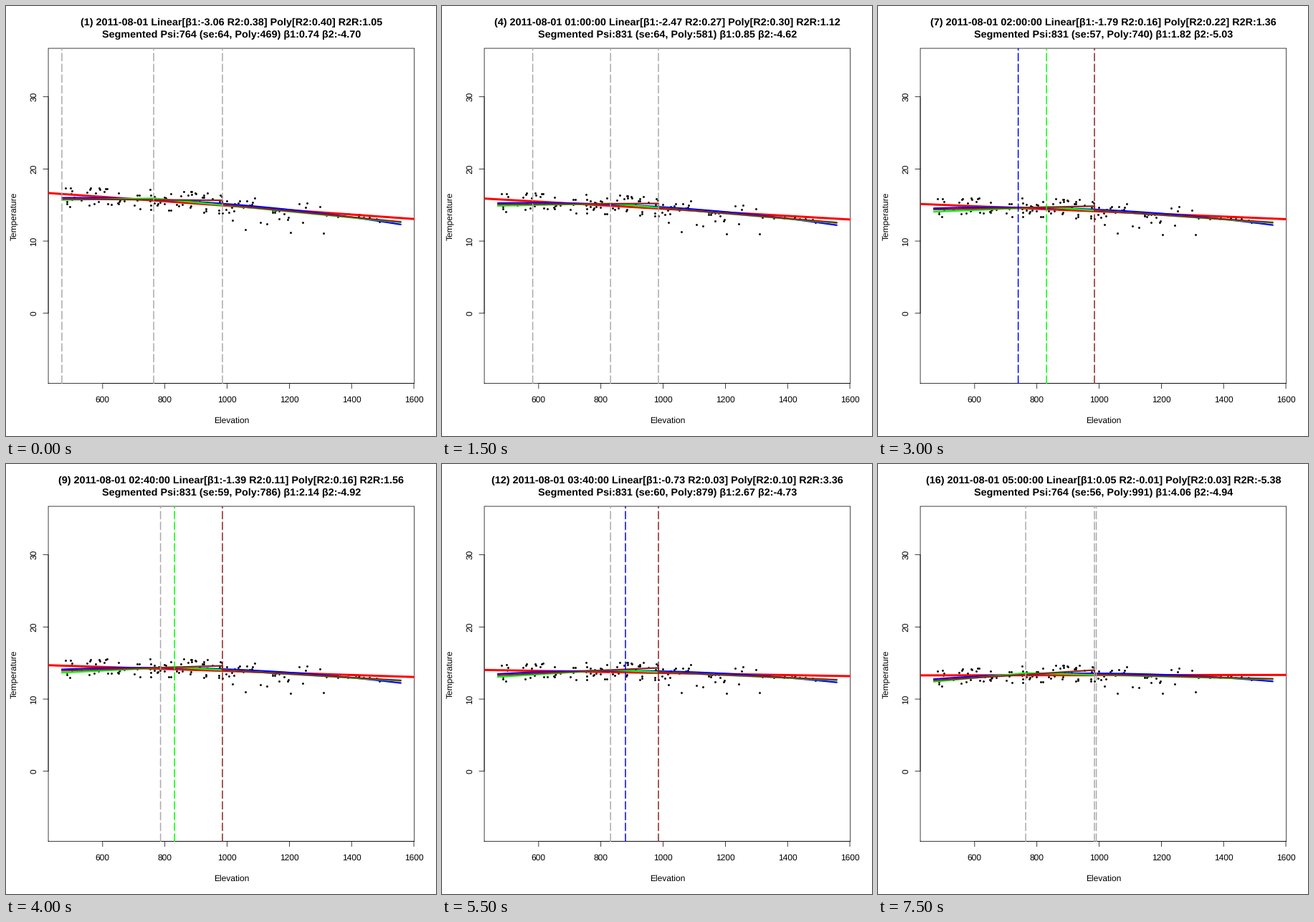
Recreate the animation shown at these times as a matplotlib script. Size 600 by 600 pixels, loop 8 s.

```python
import numpy as np
import matplotlib.pyplot as plt
from matplotlib.animation import FuncAnimation

FRAMES, STEP, SIZE = 16, 500, 600
LOW, BREAK, HIGH = 469, 985, 1558        # elevations of the fitted pieces
XLIM = (LOW - 0.04 * (HIGH - LOW), HIGH + 0.04 * (HIGH - LOW))
YLIM = (-9.72, 36.72)
BOX = (59.04, 73.44, 510.72, 467.52)     # plot area in pixels, from the bottom left
PER_X = BOX[2] / (XLIM[1] - XLIM[0])     # pixels per unit
PER_Y = BOX[3] / (YLIM[1] - YLIM[0])
GREEN, BROWN, GREY = "#00ff00", "#8b2323", "#a9a9a9"

plt.rcParams["font.family"] = "Liberation Sans"
plt.rcParams["text.hinting"] = "none"

# Title readings at a few steps.
KEYS = np.array([0, 3, 6, 8, 11, 13, 15])
READINGS = {
    "slope": (-3.06, -2.47, -1.79, -1.39, -0.73, -0.29, 0.05),
    "r2": (0.381, 0.268, 0.162, 0.1051, 0.0298, -0.00036846, -0.005576),
    "poly_r2": (0.40, 0.30, 0.22, 0.164, 0.10, 0.05, 0.03),
    "psi": (764, 831, 831, 831, 831, 766, 764),
    "se": (64, 64, 57, 59, 60, 55, 56),
    "vertex": (469, 581, 740, 786, 879, 932, 991),
    "beta1": (0.74, 0.85, 1.82, 2.14, 2.67, 3.72, 4.06),
    "beta2": (-4.70, -4.62, -5.03, -4.92, -4.73, -4.97, -4.94),
}


def readings(i):
    r = {k: np.interp(i, KEYS, v) for k, v in READINGS.items()}
    r["psi"] = READINGS["psi"][np.abs(KEYS - i).argmin()]
    return r


def linear(i, x):
    """Straight trend: the mean cools with an ease-out while the slope flattens."""
    mean = 15.27 - 0.174 * i + 0.0029 * i ** 2
    return mean + readings(i)["slope"] / 1000 * (x - 880)


def poly(i, x):
    u = (x - 992) / 544
    return linear(i, x) + 0.24 - 0.11 * u - 0.94 * u ** 2


def make_dots():
    """Elevation of each station and its distance from the curve."""
    rng = np.random.default_rng(5)
    x = np.concatenate([rng.uniform(a, b, n) for a, b, n in
                        ((480, 820, 56), (820, 985, 38), (985, 1180, 24), (1180, 1530, 20))])
    spread = np.interp(x, [1200, 1500], [0.85, 0.3])
    off = np.clip(rng.normal(0, 1, x.size), -1.6, 1.6) * spread
    cold_x = np.array([1018, 1059, 1107, 1128, 1168, 1203, 1243, 1310])
    cold_y = np.array([12.9, 11.6, 12.6, 12.4, 13.1, 11.2, 12.6, 11.1])
    return np.append(x, cold_x), np.append(off, cold_y - poly(0, cold_x))


fig = plt.figure(figsize=(SIZE / 72, SIZE / 72), dpi=72, facecolor="white")
ax = fig.add_axes([v / SIZE for v in BOX])
ax.set(xlim=XLIM, ylim=YLIM)
ax.axis("off")


def label(x, y, text="", size=12, **kw):
    return fig.text(x / SIZE, 1 - y / SIZE, text, fontsize=size, ha="center",
                    va="baseline", rotation_mode="anchor", **kw)


def line(color, width, z, xs=(), ys=(), **kw):
    return ax.plot(xs, ys, color=color, lw=width, zorder=z, snap=False,
                   solid_capstyle="round", **kw)[0]


def rule(xs, ys):
    line("black", 0.75, 1, xs, ys, clip_on=False)


(l, r), (b, t) = XLIM, YLIM
rule([l, r, r, l, l], [b, b, t, t, b])
rule([600, 1600], [b, b])
rule([l, l], [0, 30])
for e in range(600, 1601, 200):
    rule([e, e], [b, b - 7.2 / PER_Y])
    label(BOX[0] + (e - l) * PER_X, 552.7, str(e))
for deg in range(0, 31, 10):
    rule([l, l - 7.2 / PER_X], [deg, deg])
    label(42.3, SIZE - BOX[1] - (deg - b) * PER_Y, str(deg), rotation=90)
label(314.4, 582, "Elevation")
label(13.8, 293, "Temperature", rotation=90)
title = [label(314.4, y, size=14.4, weight="bold") for y in (27, 44)]

dots_x, dots_off = make_dots()
dots = ax.scatter(dots_x, dots_off, s=2.9 ** 2, c="black", lw=0, zorder=2)
red = line("red", 3, 3)
blue = line("blue", 2.25, 4)
green = line(GREEN, 2.25, 4)
brown = line(BROWN, 2.25, 5)
guides = [line(GREY, 1.5, 6, dashes=(7, 3), dash_capstyle="round") for _ in range(3)]
curve_x = np.linspace(LOW, HIGH, 80)


def draw(i):
    v = readings(i)
    psi, vertex = v["psi"], v["vertex"]
    clock = f" {i // 3:02d}:{i % 3 * 20:02d}:00" if i else ""
    title[0].set_text(f"({i + 1}) 2011-08-01{clock} Linear[β1:{v['slope']:.2f} "
                      f"R2:{v['r2']:.2f}] Poly[R2:{v['poly_r2']:.2f}] "
                      f"R2R:{v['poly_r2'] / v['r2']:.2f}")
    title[1].set_text(f"Segmented Psi:{psi} (se:{v['se']:.0f}, Poly:{vertex:.0f}) "
                      f"β1:{v['beta1']:.2f} β2:{v['beta2']:.2f}")

    # The scatter tightens as the night goes on.
    y = poly(i, dots_x) + dots_off * (1 - 0.012 * i)
    dots.set_offsets(np.column_stack([dots_x, y]))

    red.set_data(XLIM, [linear(i, x) for x in XLIM])
    blue.set_data(curve_x, poly(i, curve_x))
    top = linear(i, psi) + 0.3
    green.set_data([LOW, psi, HIGH], [top - v["beta1"] / 1000 * (psi - LOW), top,
                                      linear(i, HIGH) - 0.6])
    xs = np.array([LOW, BREAK, BREAK, HIGH])
    brown.set_data(xs, linear(i, xs) + [-0.7, 0.7, 0.1, -0.53])

    lit = (5 <= i < 8 or 10 <= i < 12, 5 <= i < 10, 5 <= i < 12)
    for guide, x, color, on in zip(guides, (vertex, psi, BREAK),
                                   ("blue", GREEN, BROWN), lit):
        guide.set_data([x, x], YLIM)
        guide.set_color(color if on else GREY)
    return [*title, dots, red, blue, green, brown, *guides]


anim = FuncAnimation(fig, draw, frames=FRAMES, interval=STEP,
                     repeat=True, repeat_delay=0)
plt.show()
```
